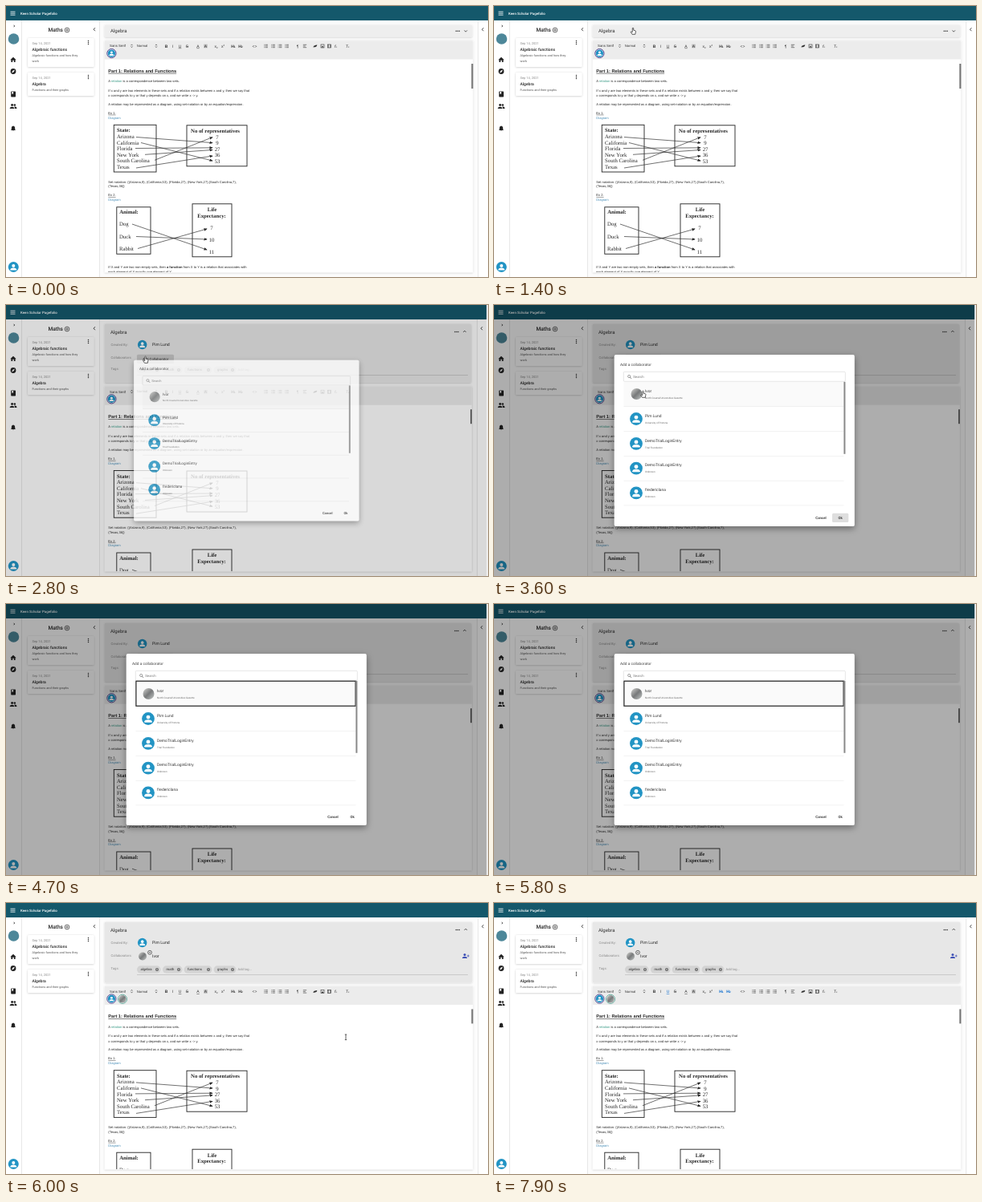
An HTML page for the animation above (8000 ms loop, 600x338 px).

```html
<!DOCTYPE html>
<html lang="en">
<head>
<meta charset="utf-8">
<style>
html, body { margin: 0; width: 100%; height: 100%; overflow: hidden; background: #fff; }
svg { display: block; width: 600px; height: 338px; fill: #262626; font-family: Roboto, sans-serif; text-rendering: geometricPrecision; }
.doc, .bar { font-family: "Liberation Sans", sans-serif; }
.serif { font-family: "Liberation Serif", serif; }
.line { fill: none; stroke: #333; }
.active { fill: #06c; }
</style>
</head>
<body>
<svg id="stage" viewBox="0 0 600 338"></svg>
<script>
const LOOP = 8000;

// Drawing helpers: y of a text is its vertical centre.
const text = (x, y, s, size, extra = '') =>
  `<text x="${x}" y="${y + size * 0.36}" font-size="${size}" ${extra}>${s}</text>`;
const rect = (x, y, w, h, fill, extra = '') =>
  `<rect x="${x}" y="${y}" width="${w}" height="${h}" fill="${fill}" ${extra}/>`;
const circle = (x, y, r, fill, extra = '') =>
  `<circle cx="${x}" cy="${y}" r="${r}" fill="${fill}" ${extra}/>`;
const path = (d, extra = '') => `<path d="${d}" class="line" ${extra}/>`;
const group = (attrs, ...parts) => `<g ${attrs}>${parts.join('')}</g>`;
const BOLD = 'font-weight="700" ', MEDIUM = 'font-weight="500" ', MID = 'text-anchor="middle" ';
const GREY = 'fill="#8c8c8c"';

const person = (x, y, r) => group(`transform="translate(${x} ${y}) scale(${r})"`,
  circle(0, 0, 1, '#2294c4'), circle(0, -0.24, 0.31, '#fff'),
  '<path d="M-.6 .6V.45Q-.5 .15 0 .15T.6 .45V.6Z" fill="#fff"/>');
const photo = (x, y, r) => circle(x, y, r, 'url(#photo)');
const ring = (x, y, colour) => circle(x, y, 5.6, '#fff', `stroke="${colour}" stroke-width=".9"`);
const dots = (x, y, dx, dy) => [-1, 0, 1].map(i => circle(x + i * dx, y + i * dy, 0.75, '#333')).join('');
const chevron = (x, y, dx, dy = 2) => path(`M${x + dx} ${y - dy}L${x - dx} ${y}L${x + dx} ${y + dy}`, 'stroke-width=".9"');

function header() {
  return rect(0, 0, 600, 18, '#14586b') +
    path('M5.5 7.2H11.5M5.5 9.2H11.5M5.5 11.2H11.5', 'style="stroke:#fff" stroke-width=".8"') +
    text(18, 9.3, 'Keen Scholar Pagefolio', 4.4, 'fill="#fff" ' + MEDIUM);
}

function sidebar() {
  return rect(19, 18, 0.7, 320, '#ddd') + rect(116.2, 18, 0.7, 320, '#ddd') +
    chevron(10.2, 25, -0.5, 1.2) + chevron(110, 29.2, 0.9) +
    circle(9.5, 41, 6.8, '#4d8799') +
    '<path fill="#222" d="M5.3 67.2L9 63.8L12.7 67.2H11.6V70H9.8V67.8H8.2V70H6.4V67.2Z"/>' +
    circle(9, 81.5, 3.4, '#222') + '<path fill="#fff" d="M11 79.5L9.7 82.2L7 83.5L8.3 80.8Z"/>' +
    rect(6.2, 106.6, 5.8, 6.8, '#222', 'rx=".7"') + rect(7.3, 107, 1.8, 2.6, '#fff') +
    circle(7.6, 123.5, 1.4, '#222') + circle(10.8, 123.5, 1.3, '#222') +
    '<path fill="#222" d="M4.8 128V127Q7.6 124.4 10.2 127V128ZM10.8 128V126.6L10 125.7Q12.4 125 13.4 127V128Z"/>' +
    '<path fill="#222" d="M6 155H12L11.2 154V152Q11 149.8 9 149.6Q7 149.8 6.8 152V154ZM8.2 155.5H9.8L9 156.3Z"/>' +
    person(9.3, 325.5, 6.5);
}

function card(y, h, title, lines) {
  return rect(27, y, 82.5, h, '#fff', 'rx="1.5" filter="url(#soft)"') +
    text(32.5, y + 7, 'Sep 14, 2021', 4.05, GREY) +
    text(32.5, y + 14, title, 5, MEDIUM) +
    lines.map((s, i) => text(32.5, y + 22 + i * 6.8, s, 3.85, 'fill="#555"')).join('') +
    dots(102.5, y + 5.6, 0, 2);
}

function notes() {
  return text(52.4, 30, 'Maths', 6.6, MEDIUM) +
    circle(76, 30, 2.9, 'none', 'stroke="#333" stroke-width=".7"') +
    path('M74.3 30H77.7M76 28.3V31.7', 'stroke-width=".7"') +
    card(40, 36, 'Algebraic functions', ['Algebraic functions and how they', 'work']) +
    card(83, 29, 'Algebra', ['Functions and their graphs']);
}

function chip(x, w, label) {
  const cx = x + w - 4.5;
  return rect(x, 76.3, w, 9.2, '#d3d3d3', 'rx="4.6"') + text(x + 4.6, 80.8, label, 4.25) +
    circle(cx, 80.9, 2, '#666') +
    path(`M${cx - 0.8} 80.1l1.6 1.6m0 -1.6l-1.6 1.6`, 'style="stroke:#e8e8e8" stroke-width=".5"');
}

function details() {
  return text(130.5, 49, 'Created By:', 4.2, GREY) + person(169.7, 49.5, 5.7) + text(182, 49.5, 'Pim Lund', 5.2) +
    text(130.5, 65.6, 'Collaborators:', 4.2, GREY) +
    group('id="addButton"', rect(163, 61.7, 46, 11.4, '#f2f2f2', 'id="addFace" rx="1.5"'),
      text(186, 67.4, 'Add Collaborator', 4.3, MID)) +
    group('id="added"', photo(170, 66.5, 5), circle(179, 61.7, 2.4, '#eee', 'stroke="#333" stroke-width=".7"'),
      path('M177.8 61.7H180.2', 'stroke-width=".7"'), text(182, 66.3, 'Ivor', 5.2),
      circle(571, 64.6, 1.5, '#3f51b5'), '<path fill="#3f51b5" d="M568 69V68Q571 65.4 574 68V69Z"/>',
      path('M573.8 66H576.8M575.3 64.5V67.5', 'style="stroke:#3f51b5" stroke-width=".7"')) +
    group('id="tags"', text(130.5, 79, 'Tags:', 4.2, GREY),
      chip(163, 29.5, 'algebra'), chip(195, 24.5, 'math'), chip(221.5, 35, 'functions'), chip(258.5, 28, 'graphs'),
      text(288.5, 80.8, 'Add tag...', 4.1, GREY), rect(163, 87, 412, 0.5, '#aaa'));
}

function toolbar() {
  const y = 49.8, label = (x, s, extra = '') => text(x, y, s, 5, MID + extra);
  const sorter = x => path(`M${x - 1} ${y - 0.6}l1 -1.3l1 1.3M${x - 1} ${y + 0.6}l1 1.3l1 -1.3`, 'stroke-width=".6"');
  const list = x => path(`M${x - 1} 48.3h3.4M${x - 1} 50h3.4M${x - 1} 51.7h3.4M${x - 2.3} 48.3h.7M${x - 2.3} 50h.7M${x - 2.3} 51.7h.7`, 'stroke-width=".6"');
  const box = x => rect(x - 2, 48, 4, 4, 'none', 'stroke="#333" stroke-width=".6"');
  return rect(122.8, 43.3, 458.4, 23.2, '#ececec') +
    group('class="bar" fill="#333"',
      text(129, y, 'Sans Serif', 4.35), sorter(156.5), text(162.8, y, 'Normal', 4.2), sorter(187),
      label(199.5, 'B', BOLD), label(207.5, 'I', 'font-style="italic"'),
      group('class="format"', label(216.5, 'U', 'text-decoration="underline"')),
      label(225.5, 'S', 'text-decoration="line-through"'),
      label(239, 'A', 'text-decoration="underline"'), rect(246.2, 47.7, 4.6, 4.6, '#bbb'), label(248.5, 'A'),
      label(261.5, 'x<tspan font-size="3" dy="1">2</tspan>'), label(270, 'x<tspan font-size="3" dy="-1.5">2</tspan>'),
      group('class="format" ' + BOLD, label(283, 'H<tspan font-size="3.4">1</tspan>'), label(292, 'H<tspan font-size="3.4">2</tspan>')),
      label(309.5, '&lt;&gt;'), [323.5, 332.5, 341, 349.5].map(list).join(''),
      label(363, '¶'), path('M369.8 48.3h4.4M369.8 50h3M369.8 51.7h4.4', 'stroke-width=".6"'),
      path('M383 51.5q0 -1.5 1.7 -2M386.8 48.6q0 1.5 -1.7 2M384 51L386 49', 'stroke-width="1.1"'),
      box(394), '<path d="M392.4 51.6L394 49.6L395.6 51.6Z"/>', box(402.5), path('M401.3 48v4M403.7 48v4', 'stroke-width=".6"'),
      label(410.5, '<tspan font-style="italic">f</tspan><tspan font-size="3">x</tspan>'),
      label(425, '<tspan font-style="italic">T</tspan><tspan font-size="3">x</tspan>')) +
    ring(131.4, 59.1, '#3b2c82') + person(131.4, 59.1, 4.7) +
    group('id="peer"', ring(145, 59.4, '#5aa898'), photo(145, 59.4, 4.8));
}

const arrows = list => list.map(([x1, y1, x2, y2]) =>
  path(`M${x1} ${y1}L${x2} ${y2}`, 'stroke-width=".7" marker-end="url(#tip)"')).join('');
const frame = (x, y, w, h) => rect(x, y, w, h, '#fff', 'stroke="#222" stroke-width=".9"');

function documentBody() {
  const body = (y, s, extra = '') => text(127.3, y, s, 4.08, extra);
  const example = (y, n) => body(y, `Ex ${n}.`, 'text-decoration="underline"') + body(y + 5.8, 'Diagram', 'fill="#4a8fb8"');
  const states = ['Arizona', 'California', 'Florida', 'New York', 'South Carolina', 'Texas'];
  const SIZE = 6.75;
  return group('class="doc"',
    text(127.3, 80.8, 'Part 1: Relations and Functions', 5.67, BOLD + 'text-decoration="underline"'),
    body(93.8, 'A <tspan fill="#3a9a86">relation</tspan> is a correspondence between two sets.'),
    body(105.5, 'If x and y are two elements in these sets and if a relation exists between x and y, then we say that'),
    body(111.8, 'x corresponds to y or that y depends on x, and we write x -&gt; y.'),
    body(122.4, 'A relation may be represented as a diagram, using set-notation or by an equation/expression.'),
    example(133.3, 1),
    body(219.1, 'Set notation: {(Arizona,9), (California,53), (Florida,27), (New York,27),(South Carolina,7),'),
    body(224.9, '(Texas,36)}'),
    example(236, 2),
    body(325.2, 'If X and Y are two non-empty sets, then <tspan font-weight="700">a function</tspan> from X to Y is a relation that associates with'),
    body(331.3, 'each element of X exactly one element of Y.')) +
  group('class="serif"',
    frame(134.3, 148.3, 52.7, 58.7), frame(225, 148.8, 75, 51),
    text(138, 154.9, 'State:', SIZE, BOLD), states.map((s, i) => text(138, 162.6 + i * 7.6, s, SIZE)).join(''),
    text(260.5, 155.4, 'No of representatives', SIZE, BOLD + MID),
    [7, 9, 27, 36, 53].map((n, i) => text(263, 163.2 + i * 7.6, n, SIZE, MID)).join(''),
    arrows([[162, 163.5, 257, 170.6], [168, 170.5, 257, 193], [161, 177.5, 257, 176.8], [173, 185.3, 257, 179.5], [185, 192.3, 257, 163.7], [162, 202, 257, 187]]),
    frame(137.8, 250.8, 42.2, 58.5), frame(232, 246.8, 49, 66),
    text(153, 257, 'Animal:', SIZE, BOLD + MID),
    ['Dog', 'Duck', 'Rabbit'].map((s, i) => text(141, 272 + i * 15.3, s, SIZE)).join(''),
    text(256.5, 253.7, 'Life', SIZE, BOLD + MID), text(256, 261.4, 'Expectancy:', SIZE, BOLD + MID),
    [7, 10, 11].map((n, i) => text(256, 276.4 + i * 15.2, n, SIZE, MID)).join(''),
    arrows([[157, 272, 250, 304], [162, 287.5, 250, 291], [164, 302.5, 250, 278]]));
}

function dialog() {
  const people = [['Ivor', 'North Coastal Universities Gazette'], ['Pim Lund', 'University of Pretoria'],
    ['DemoTrialLoginEntry', 'Trial Foundation'], ['DemoTrialLoginEntry', 'Unknown'], ['fredericlana', 'Unknown']];
  const rows = people.map(([name, place], i) => {
    const y = 96 + i * 30.8;
    return (i ? person(177, y + 15.2, 7.9) : rect(161.5, y, 274, 30.8, '#fafafa') + photo(177.5, y + 15, 7)) +
      text(188, y + 11.3, name, 4.9, 'fill="#333"') + text(188, y + 20, place, 3.05, 'fill="#666"') +
      rect(161.5, y + 30.5, 274, 0.5, '#e4e4e4');
  });
  return rect(149.8, 62, 299, 214, '#fff', 'rx="2" filter="url(#deep)"') +
    text(157, 73.8, 'Add a collaborator', 4.75, 'fill="#444"') +
    rect(161.3, 83.3, 276, 12, '#fff', 'stroke="#d5d5d5" stroke-width=".6" rx="1"') +
    circle(168.2, 89, 1.6, 'none', 'stroke="#666" stroke-width=".6"') + path('M169.4 90.2L171 91.8', 'stroke-width=".7"') +
    text(173.3, 89.7, 'Search', 4.3, 'fill="#777"') +
    group('clip-path="url(#listClip)"', group('id="rows"', ...rows)) +
    rect(161.9, 96.2, 273.2, 31, 'none', 'id="selected" stroke="#222" stroke-width="1.2"') +
    rect(435.4, 95.8, 2, 90, '#8a8a8a') +
    rect(421, 259.8, 20.3, 11.2, '#dedede', 'id="okFace" rx="1.5"') +
    text(407, 265.1, 'Cancel', 4.4, MID + MEDIUM) + text(431.2, 265.1, 'Ok', 4.4, MID + MEDIUM);
}

const cursors = {
  arrow: '<path d="M0 0V7.2L1.7 5.7L2.8 8.2L3.9 7.7L2.8 5.3H5Z"/>',
  hand: '<path d="M-.7 .6Q0 -.4 .7 .6V3.2L3 3.8Q3.6 4.1 3.4 5L2.8 8.3H-1L-2.9 5.4Q-2.6 4.5 -.7 5.6Z"/>',
  beam: '<path d="M-1.2 0H1.2M0 0V6.6M-1.2 6.6H1.2" style="stroke:#222"/>'
};

const $ = id => document.getElementById(id);
$('stage').innerHTML = `<defs>
  <linearGradient id="photo" x2="1" y2="1"><stop stop-color="#d5d5d2"/><stop offset=".5" stop-color="#77797a"/><stop offset="1" stop-color="#c4c8c6"/></linearGradient>
  <filter id="soft" x="-10%" y="-20%" width="120%" height="140%"><feDropShadow dx="0" dy=".5" stdDeviation=".8" flood-opacity=".22"/></filter>
  <filter id="deep"><feDropShadow dx="0" dy="3" stdDeviation="4" flood-opacity=".4"/></filter>
  <marker id="tip" viewBox="0 0 6 6" refX="5" refY="3" markerWidth="4.2" markerHeight="4.2" markerUnits="userSpaceOnUse" orient="auto"><path d="M0 .5L6 3L0 5.5Z"/></marker>
  <clipPath id="panelClip"><rect id="panelHole" x="122" y="20" width="460"/></clipPath>
  <clipPath id="docClip"><rect id="docHole" x="122" y="40" height="292"/></clipPath>
  <clipPath id="listClip"><rect x="161" y="96" width="275" height="157.5"/></clipPath></defs>` +
  rect(0, 0, 600, 338, '#fff') + rect(117, 18, 470.5, 320, '#fcfcfc') + sidebar() + notes() + header() +
  rect(122.8, 23.8, 457.4, 15, '#ebebeb', 'id="panel" rx="1" filter="url(#soft)"') +
  text(130, 31.3, 'Algebra', 6, 'id="title" fill="#333"') +
  group('clip-path="url(#panelClip)"', group('id="details"', details())) +
  rect(122.8, 43.3, 458.4, 289, '#fff', 'id="sheet" filter="url(#soft)"') +
  group('clip-path="url(#docClip)"', group('id="editor"', toolbar(), documentBody())) +
  group('id="rightSide"', rect(587.5, 18, 0.7, 320, '#ddd'), chevron(593.5, 29.2, 0.9),
    group('id="more"', dots(562.3, 31.3, 2, 0)), path('M-1.7 -.9L0 .9L1.7 -.9', 'id="toggle" stroke-width=".8"'),
    rect(579.4, 72, 2, 31, '#707070', 'id="thumb"')) +
  rect(0, 0, 600, 338, '#000', 'id="shade"') + rect(598.2, 0, 1.8, 338, '#f1f1f1', 'id="gutter"') +
  group('id="dialog"', dialog()) +
  group('id="cursor" fill="#fff" stroke="#222" stroke-width=".7" stroke-linejoin="round"',
    ...Object.entries(cursors).map(([name, d]) => group(`id="${name}"`, d)));

const clamp = v => Math.min(1, Math.max(0, v));
const progress = (t, start, length) => clamp((t - start) / length);
const smooth = p => p * p * (3 - 2 * p);
const easeOut = p => 1 - (1 - p) ** 3;
const set = (id, attrs) => Object.entries(attrs).forEach(([k, v]) => $(id).setAttribute(k, v));
const show = (id, on) => set(id, { visibility: on ? 'visible' : 'hidden' });

// Pointer paths: [time, x, y]; each is visible until its end time.
const trips = [
  { end: 4300, points: [[500, 568, 184], [600, 500, 150], [700, 340, 80], [800, 200, 38], [900, 149, 28], [1000, 172, 24],
    [1300, 172, 25], [1400, 173, 27], [1600, 173, 27], [1900, 173.7, 32.4], [2100, 173.7, 32.4], [2400, 173.5, 64], [2900, 173.5, 64], [3400, 185.5, 107]] },
  { end: 6100, points: [[5900, 431, 261], [6000, 423, 164]] },
  { end: 7700, points: [[7500, 498, 165], [7600, 350, 152]] }
];

function drawCursor(t) {
  const trip = trips.find(({ end, points }) => t >= points[0][0] && t < end);
  const shape = t < 1000 ? 'arrow' : t < 4300 ? 'hand' : 'beam';
  Object.keys(cursors).forEach(name => show(name, trip && name === shape));
  if (!trip) return;
  const { points } = trip;
  const next = points.findIndex(p => p[0] > t);
  const b = points.at(next), a = next > 0 ? points[next - 1] : b;
  const p = a === b ? 0 : (t - a[0]) / (b[0] - a[0]);
  set('cursor', { transform: `translate(${a[1] + (b[1] - a[1]) * p} ${a[2] + (b[2] - a[2]) * p})` });
}

function draw(t) {
  const added = t >= 5900, picked = t >= 3800;
  const open = smooth(progress(t, 1550, 300));
  const shift = 58.2 * open + (added ? 2.2 : 0);

  // While the dialog is up, a page gutter narrows the layout.
  const locked = t >= 2735 && !added;
  const inset = locked ? 1.4 : 0;
  show('gutter', locked);
  set('rightSide', { transform: `translate(${-inset} 0)` });

  set('panel', { width: 457.4 - inset, height: 15 + shift, fill: open ? '#e7e7e7' : '#eeeeee' });
  set('panelHole', { height: 18.8 + shift });
  set('title', { transform: `translate(0 ${2.7 * open})` });
  set('more', { transform: `translate(0 ${2.2 * open})` });
  set('toggle', { transform: `translate(572.3 ${31.3 + 1.7 * open}) rotate(${180 * open})` });
  set('details', { opacity: open });
  set('editor', { transform: `translate(0 ${shift})` });
  set('docHole', { width: 459.2 - inset });
  set('sheet', { y: 43.3 + shift, width: 458.4 - inset, height: 289 - shift });
  set('thumb', { y: 72 + shift, height: 31 - 13 * open });
  show('addButton', !added);
  show('added', added);
  show('peer', added);
  set('tags', { transform: `translate(0 ${added ? 2 : 0})` });
  set('addFace', { fill: t >= 2300 ? '#c8c8c8' : '#f2f2f2' });
  document.querySelectorAll('.format').forEach(g => g.classList.toggle('active', t >= 7900));

  const fade = 1 - progress(t, 5850, 100);
  const grow = easeOut(progress(t, 2735, 160));
  set('shade', { opacity: 0.32 * easeOut(progress(t, 2735, 350)) * fade });
  set('dialog', { opacity: grow * fade, transform: `translate(299.3 169) scale(${0.7 + 0.3 * grow}) translate(-299.3 -169)` });
  set('rows', { transform: `translate(0 ${picked ? 1 : 0})` });
  show('selected', picked);
  show('okFace', t >= 2900 && !picked);
  drawCursor(t);
}

function tick() {
  draw(Math.floor(performance.now() % LOOP / 100) * 100);
  requestAnimationFrame(tick);
}
tick();
</script>
</body>
</html>
```
